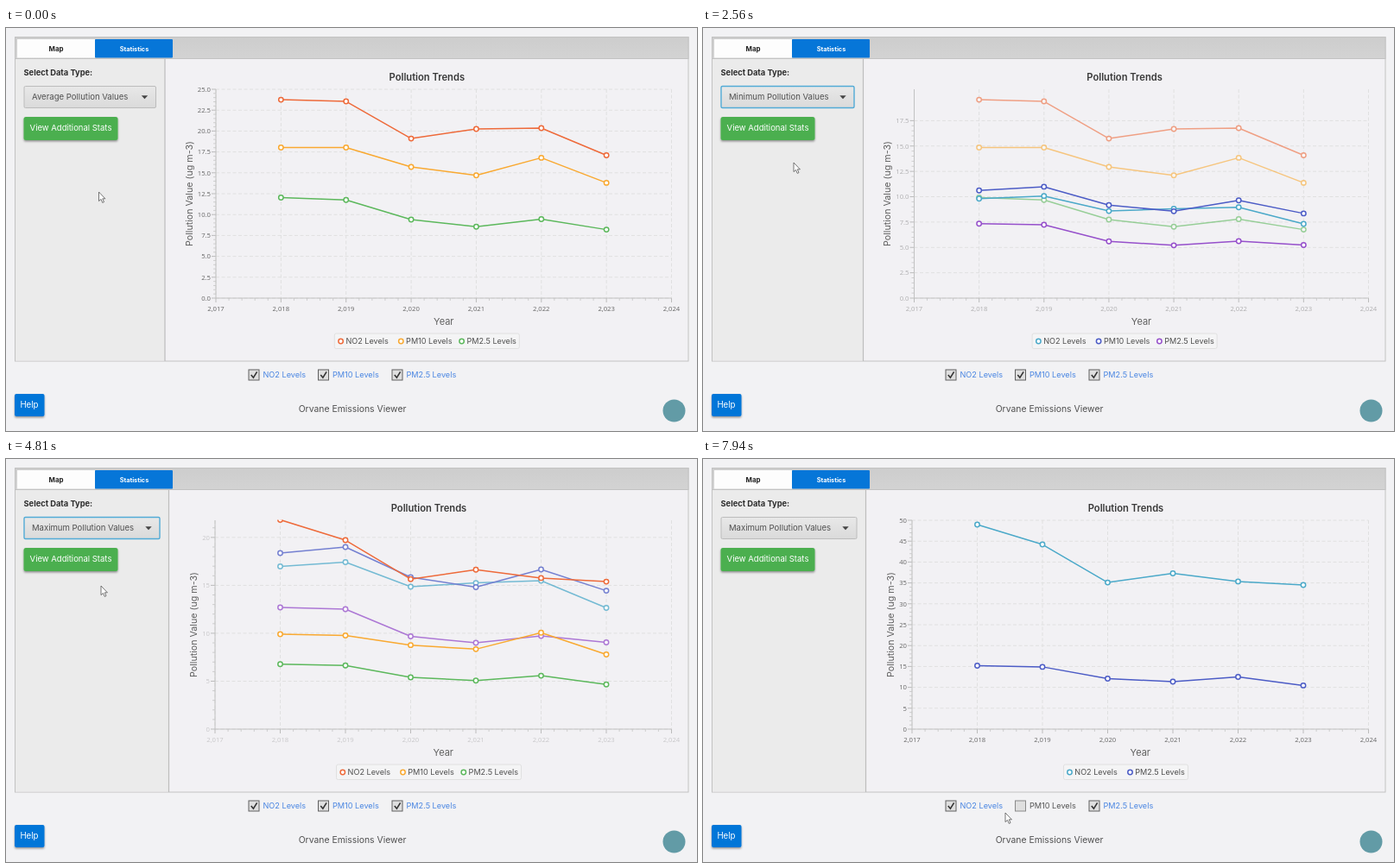
An HTML page that plays this animation: 800x467 px, repeating every 8000 ms.

```html
<!DOCTYPE html>
<html lang="en">
<head>
<meta charset="utf-8">
<title>Pollution trends</title>
<style>
html, body { margin: 0; width: 100%; height: 100%; overflow: hidden; background: #f2f2f4; }
svg { display: block; width: 800px; height: 467px; font-family: Inter, "Open Sans", sans-serif; }
.tick { font-family: "Open Sans", sans-serif; }
</style>
</head>
<body>
<svg id="stage" viewBox="0 0 800 467" xmlns="http://www.w3.org/2000/svg">
  <defs>
    <linearGradient id="bar" x2="0" y2="1"><stop stop-color="#cdcdcd"/><stop offset="1" stop-color="#d3d3d3"/></linearGradient>
    <linearGradient id="btn" x2="0" y2="1"><stop stop-color="#e8e8e8"/><stop offset="1" stop-color="#dadada"/></linearGradient>
    <filter id="shade" x="-20%" y="-30%" width="140%" height="180%"><feDropShadow dx="0" dy="1.5" stdDeviation="1.3" flood-opacity=".4"/></filter>
    <clipPath id="plot"><rect x="236" y="70.5" width="540" height="243"/></clipPath>
  </defs>
  <rect width="800" height="467" fill="#f2f2f4"/>
  <g id="base"></g>
  <g id="panel"></g>
  <g id="chart"></g>
  <g id="checks"></g>
  <g id="popup"></g>
  <path id="cursor" d="M0 0V10.6L2.5 8.4L4.2 12.4L6 11.6L4.3 7.8H7.4Z" fill="#fff" stroke="#555" stroke-width=".8" stroke-linejoin="round"/>
</svg>
<script>
const LOOP = 8000, TOP = 71, BOTTOM = 313, RIGHT = 770.5;
const COLORS = ['#ee6a3a', '#f9a931', '#5cb85c', '#4ba9c9', '#4c5cc6', '#9650cb'];
const LABELS = ['NO2 Levels', 'PM10 Levels', 'PM2.5 Levels'];
const KINDS = ['Average', 'Minimum', 'Maximum'].map(k => k + ' Pollution Values');

const AVERAGE = [
  [23.75, 23.55, 19.1, 20.25, 20.35, 17.1],
  [18.03, 18.03, 15.7, 14.7, 16.8, 13.8],
  [12.03, 11.75, 9.4, 8.55, 9.45, 8.2]];
const MINIMUM = [
  [13.63, 13.99, 11.93, 12.25, 12.44, 10.16],
  [14.75, 15.26, 12.73, 11.9, 13.38, 11.6],
  [10.2, 10.05, 7.77, 7.23, 7.81, 7.27]];
const MAXIMUM = [
  [48.97, 44.2, 35.1, 37.3, 35.35, 34.5],
  [22.2, 21.9, 19.65, 18.7, 22.55, 17.45],
  [15.2, 14.9, 12.1, 11.35, 12.5, 10.45]];

const avgView = { kind: 0, max: 25, step: 2.5, left: 243, mid: 487.3, axisX: 212, comboW: 152.5, edge: 184 };
const minView = { kind: 1, max: 17.5, step: 2.5, left: 244.5, mid: 488.1, axisX: 213.5, comboW: 154, edge: 185.5 };
const maxView = { kind: 2, max: 50, step: 5, left: 242, mid: 489.5, axisX: 217, comboW: 157, edge: 188.5 };

// Each phase starts when the user changes the selection.
const PHASES = [
  { at: -5000, view: avgView, data: AVERAGE, shown: [0, 1, 2], tint: 0 },
  { at: 2201, view: minView, data: MINIMUM, shown: [0, 1, 2], tint: 3 },
  { at: 4588, view: maxView, data: MAXIMUM, shown: [0, 1, 2], tint: 0 },
  { at: 6800, view: maxView, data: MAXIMUM, shown: [0, 2], tint: 3 }];
const AXIS_LAG = 11;

const POPUPS = [[1560, 2201], [4000, 4588]];
const FOCUS = [1500, 6740];
const UNCHECK = 6740;

// time, x, y of the pointer
const PATH = [
  [0, 107.5, 190], [250, 107.5, 190], [1150, 115, 85], [1620, 115, 85], [2050, 106, 129],
  [2220, 105, 131], [2560, 105, 156], [3060, 107, 172], [3250, 107, 172], [3850, 115, 84],
  [4080, 115, 84], [4480, 110, 147], [4850, 110, 147], [5200, 125, 175], [6450, 374, 405],
  [7000, 374, 405], [7700, 350, 410], [8000, 350, 410]];

const $ = id => document.getElementById(id);
const clamp = v => Math.max(0, Math.min(1, v));
const lerp = (a, b, k) => a + (b - a) * k;

const text = (x, y, str, size, fill = '#505050', extra = '') =>
  `<text x="${x}" y="${y}" dy=".36em" font-size="${size}" fill="${fill}" ${extra}>${str}</text>`;
const rect = (x, y, w, h, fill, extra = '') =>
  `<rect x="${x}" y="${y}" width="${w}" height="${h}" fill="${fill}" ${extra}/>`;
const path = (d, stroke, width = 1, extra = '') =>
  `<path d="${d}" fill="none" stroke="${stroke}" stroke-width="${width}" ${extra}/>`;
const dot = (x, y, color) =>
  `<circle cx="${x}" cy="${y}" r="2.7" fill="#fff" stroke="${color}" stroke-width="1.5"/>`;
const MIDDLE = 'text-anchor="middle" ', END = 'text-anchor="end" ', BOLD = 'font-weight="700" ';

function pointer(t) {
  const i = Math.max(1, PATH.findIndex(p => p[0] >= t));
  const a = PATH[i - 1], b = PATH[i];
  const k = clamp((t - a[0]) / (b[0] - a[0])), e = k * k * (3 - 2 * k);
  return [lerp(a[1], b[1], e), lerp(a[2], b[2], e)];
}

function drawBase() {
  $('base').innerHTML =
    rect(10.5, 10.5, 779.5, 375.5, '#f2f1f4', 'stroke="#c2c2c2"') +
    rect(10.5, 10.5, 779.5, 25, 'url(#bar)', 'stroke="#c2c2c2"') +
    rect(13, 13, 90, 21.5, '#fdfdfd') +
    rect(103, 13, 90, 21.5, '#0676d8', 'rx="1"') +
    text(58, 24.5, 'Map', 7.9, '#222', MIDDLE + BOLD) +
    text(148.5, 24.5, 'Statistics', 7.3, '#fff', MIDDLE + BOLD) +
    rect(10, 424, 34.5, 26, '#0676d8', 'rx="2" filter="url(#shade)"') +
    text(27, 437, 'Help', 9.7, '#fff', MIDDLE) +
    text(401, 441, 'Orvane Emissions Viewer', 10.4, '#505050', MIDDLE) +
    '<circle cx="773.5" cy="443.5" r="13" fill="#629ba6"/>';
}

function panel(view, focused) {
  const { comboW, edge } = view, ax = 8 + comboW;
  return rect(11, 36, edge - 11, 349.5, '#ebebeb') +
    path(`M${edge} 36V386`, '#bdbdbd', 1.2) +
    text(20.5, 51.5, 'Select Data Type:', 9.3, '#2c2c2c', BOLD) +
    rect(21, 67.5, comboW, 25, 'url(#btn)', focused
      ? 'rx="1.5" stroke="#52abd6" stroke-width="1.4"' : 'rx="1.5" stroke="#bcbcbc"') +
    text(30, 80, KINDS[view.kind], 9.55) +
    `<path d="M${ax - 3.7} 78.3h7.4l-3.7 4z" fill="#444"/>` +
    rect(20.5, 103, 109, 27, '#4caf50', 'rx="2.5" filter="url(#shade)"') +
    text(75, 116, 'View Additional Stats', 9.5, '#fff', MIDDLE);
}

function series(phase, left, scale, grow, opacity) {
  const gap = (RIGHT - left) / 7;
  const body = phase.shown.map((s, i) => {
    const color = COLORS[phase.tint + i];
    const pts = phase.data[s].map((v, j) => [left + gap * (j + 1), BOTTOM - v * scale * grow]);
    return path('M' + pts.map(p => p.join(' ')).join('L'), color, 1.5, 'stroke-linejoin="round"') +
      pts.map(p => dot(p[0], p[1], color)).join('');
  }).join('');
  return `<g opacity="${opacity}">${body}</g>`;
}

function axes(view, scale, fade) {
  const { left, step, max } = view, gap = (RIGHT - left) / 7;
  let grid = '', major = '', minor = '', labels = '';
  for (let i = 0; i <= 35; i++) {
    const x = left + gap * i / 5;
    if (i % 5) { minor += `M${x} ${BOTTOM}v3`; continue; }
    grid += `M${x} ${TOP}V${BOTTOM}`;
    major += `M${x} ${BOTTOM}v5`;
    labels += text(x, 325, '2,0' + (17 + i / 5), 7.7, '#666', MIDDLE);
  }
  const count = Math.round(max / step) * 5;
  for (let i = 0; i <= count; i++) {
    const v = i * step / 5, y = BOTTOM - v * scale;
    if (y < TOP - .5) break;
    if (i % 5) { minor += `M${left} ${y}h-3`; continue; }
    grid += `M${left} ${y}H${RIGHT}`;
    major += `M${left} ${y}h-5`;
    labels += text(left - 6, y, step % 1 ? v.toFixed(1) : v, 7.7, '#666', END);
  }
  return path(grid, '#e0e0e0', 1, 'stroke-dasharray="4 2.5"') +
    path(minor, '#c6c6c6', .8) + path(major, '#b6b6b6', .9) +
    path(`M${left} ${TOP}V${BOTTOM}H${RIGHT}`, '#c2c2c2') +
    `<g class="tick" opacity="${fade}">${labels}</g>`;
}

function legend(phase) {
  const all = phase.shown.length === 3, { mid } = phase.view;
  const half = all ? 107 : 72, spots = all ? [-99.7, -30, 40.3] : [-65, 5];
  return rect(mid - half, 354, half * 2, 17.5, '#f4f4f5', 'rx="2" stroke="#e0e0e0"') +
    phase.shown.map((s, i) => dot(mid + spots[i], 363, COLORS[phase.tint + i]) +
      text(mid + spots[i] + 5.8, 362.8, LABELS[s], 9.1)).join('');
}

function chart(t, now, before) {
  const { view } = now, { left } = view, age = t - now.at;
  const unit = v => (BOTTOM - TOP) / v.max;
  const rescaled = before && before.view !== view;
  const scale = rescaled ? lerp(unit(before.view), unit(view), clamp((age - AXIS_LAG) / 700)) : unit(view);
  const axisY = 192;
  // Removed lines keep their height while they fade.
  const old = before && age < 900 ? series(before, left, unit(before.view), 1, 1 - age / 900) : '';
  return text(view.mid, 56.5, 'Pollution Trends', 11.2, '#383838', MIDDLE + 'font-weight="600"') +
    axes(view, scale, rescaled ? clamp(age / 750) : 1) +
    text(view.axisX, axisY, 'Pollution Value (ug m-3)', 10.7, '#606060',
      `${MIDDLE} transform="rotate(-90 ${view.axisX} ${axisY})"`) +
    text((left + RIGHT) / 2, 340, 'Year', 11, '#606060', MIDDLE) +
    `<g clip-path="url(#plot)">${old}${series(now, left, scale, clamp(age / 500), clamp(age / 200))}</g>` +
    legend(now);
}

function checks(t, x, y) {
  return [281, 361.5, 447].map((bx, i) => {
    const on = i !== 1 || t < UNCHECK;
    const hover = x > bx && x < bx + 70 && y > 396 && y < 408;
    return rect(bx, 396, 12, 12, hover ? '#f6f6f6' : '#dfdfdf', `stroke="${on || hover ? '#606060' : '#8a8a8a'}"`) +
      (on ? path(`M${bx + 2.8} 402l2.6 3.2l4.2 -6.8`, '#333', 1.6) : '') +
      text(bx + 16.5, 402, LABELS[i], 9.15, on ? '#4a86e2' : '#555');
  }).join('');
}

function popup(view, y) {
  const w = view.comboW, row = Math.floor((y - 95) / 24);
  const picked = row >= 0 && row < 3 ? row : view.kind;
  return rect(21, 94, w, 74, '#f6f6f6', 'stroke="#bdbdbd" filter="url(#shade)"') +
    KINDS.map((k, i) => (i === picked ? rect(21.5, 95 + i * 24, w - 1, 24, '#0096c9') : '') +
      text(30, 107 + i * 24, k, 9.55, i === picked ? '#fff' : '#444')).join('');
}

function draw(t) {
  const i = PHASES.filter(p => p.at <= t).length - 1;
  const now = PHASES[i], [x, y] = pointer(t);
  $('panel').innerHTML = panel(now.view, t >= FOCUS[0] && t < FOCUS[1]);
  $('chart').innerHTML = chart(t, now, PHASES[i - 1]);
  $('checks').innerHTML = checks(t, x, y);
  $('popup').innerHTML = POPUPS.some(p => t >= p[0] && t < p[1]) ? popup(now.view, y) : '';
  $('cursor').setAttribute('transform', `translate(${x} ${y})`);
}

drawBase();
const start = performance.now();
function frame() {
  draw((performance.now() - start) % LOOP);
  requestAnimationFrame(frame);
}
frame();
</script>
</body>
</html>
```
